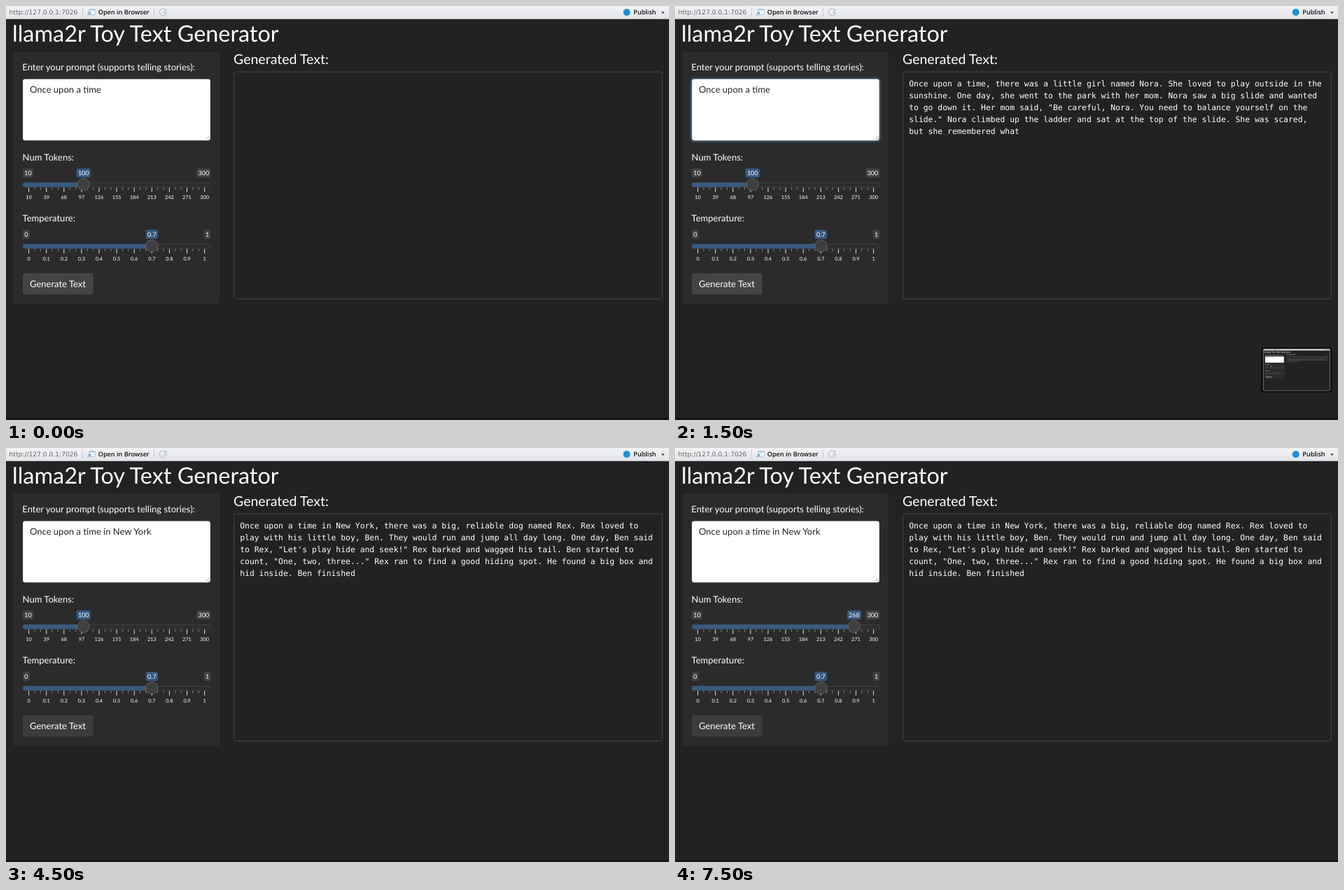
These frames come from a looping animation (947x592 px, 8000 ms). An HTML page:

```html
<!DOCTYPE html>
<html lang="en">
<head>
<meta charset="utf-8">
<title>llama2r Toy Text Generator</title>
<style>
  html, body { margin: 0; width: 100%; height: 100%; overflow: hidden; background: #222; }
  svg { display: block; }
  text { font-family: Lato, sans-serif; fill: #fff; white-space: pre; text-rendering: geometricPrecision; }
  .bar { font-family: "Open Sans", sans-serif; font-weight: 600; font-size: 9.1px; fill: #111; }
  .url { font-family: "DejaVu Sans", sans-serif; font-size: 9.15px; fill: #666; }
  .out { font-family: "DejaVu Sans Mono", monospace; font-size: 11.4px; }
</style>
</head>
<body>
<svg id="stage" width="947" height="592" viewBox="0 0 947 592"></svg>
<script>
const LOOP = 8000;
const LEFT = 24, RIGHT = 292.5, ROW = 87.8;
const stage = document.getElementById('stage');
const pen = document.createElement('canvas').getContext('2d');

const girlStory = [
  'Once upon a time, there was a little girl named Nora. She loved to play outside in the',
  'sunshine. One day, she went to the park with her mom. Nora saw a big slide and wanted',
  'to go down it. Her mom said, "Be careful, Nora. You need to balance yourself on the',
  'slide." Nora climbed up the ladder and sat at the top of the slide. She was scared,',
  'but she remembered what'
];
const dogStory = [
  'Once upon a time in New York, there was a big, reliable dog named Rex. Rex loved to',
  'play with his little boy, Ben. They would run and jump all day long. One day, Ben said',
  'to Rex, "Let\'s play hide and seek!" Rex barked and wagged his tail. Ben started to',
  'count, "One, two, three..." Rex ran to find a good hiding spot. He found a big box and',
  'hid inside. Ben finished'
];

// Each step overrides the state left by the steps before it.
const steps = [
  { at: 0, prompt: 'Once upon a time', story: [], tokens: 100, button: '#444' },
  { at: 500, story: girlStory, button: '#3c3c3c' },
  { at: 1500, focus: true, thumb: true, button: '#444' },
  { at: 2500, prompt: 'Once upon a time in New York', caret: true, thumb: false, button: '#3c3c3c' },
  { at: 3500, thumb: true },
  { at: 4500, story: dogStory, focus: false, caret: false, thumb: false },
  { at: 5500, hover: true },
  { at: 6500, tokens: 268 },
  { at: 7500, hover: false }
];

function textWidth(str, size) {
  pen.font = `${size}px Lato, sans-serif`;
  return pen.measureText(str).width;
}

const rect = (x, y, w, h, fill, r = 0, extra = '') =>
  `<rect x="${x}" y="${y}" width="${w}" height="${h}" rx="${r}" fill="${fill}" ${extra}/>`;

const text = (x, y, size, str, extra = '') =>
  `<text x="${x}" y="${y}" font-size="${size}" ${extra}>${str}</text>`;

const path = (d, stroke, width = 1, extra = '') =>
  `<path d="${d}" fill="none" stroke="${stroke}" stroke-width="${width}" ${extra}/>`;

// align: 0 puts the left edge at x, 0.5 the centre, 1 the right edge
function badge(x, align, y, value, fill) {
  const w = textWidth(value, 9) + 4.6;
  const left = x - w * align;
  return rect(left, y, w, 13, fill, 2.5) +
    text(left + w / 2, y + 9.8, 9, value, 'text-anchor="middle"');
}

function slider(row, title, low, high, value, hover) {
  const y = row * ROW;
  const x = 33 + (value - low) / (high - low) * 250.5;
  let ticks = '';
  for (let i = 0; i <= 30; i++) {
    const tx = 32.6 + i * 251 / 30, big = i % 3 === 0;
    ticks += path(`M${tx} ${y + 259.5}v${big ? 6.5 : 3.3}`, big ? '#fff' : '#999', 0.85);
    if (big) {
      const label = +(low + (high - low) * i / 30).toFixed(1);
      ticks += text(tx, y + 275.8, 7.33, label, 'text-anchor="middle"');
    }
  }
  return text(23.6, y + 220.5, 13.03, title) +
    badge(LEFT, 0, y + 232.2, low, '#414141') +
    badge(RIGHT, 1, y + 232.2, high, '#414141') +
    badge(x, 0.5, y + 232.2, value, '#375a7f') +
    ticks +
    rect(LEFT + 0.4, y + 252.7, RIGHT - LEFT - 0.8, 5.9, 'url(#groove)', 3, 'stroke="#444" stroke-width=".8"') +
    path(`M${x} ${y + 252.4}H${LEFT + 3.2}a3.25 3.25 0 0 0 0 6.5H${x}z`, 'none', 0, 'style="fill:#375a7f"') +
    `<circle cx="${x}" cy="${y + 255.2}" r="8.6" fill="${hover ? '#222' : '#3f3f3f'}" stroke="#6b6b6b" stroke-width=".8"/>`;
}

function toolbar() {
  return rect(0, 0, 947, 18.5, 'url(#chrome)') +
    path('M0 18.5H947', '#b4b6ba', 0.8) +
    '<text class="url" x="4.6" y="11.8">http://127.0.0.1:7026</text>' +
    path('M109.5 2V15M211.5 2V15', '#c8cacd') +
    rect(118.5, 4.5, 9, 8, '#f4f8fc', 1, 'stroke="#a9b9c9" stroke-width=".8"') +
    path('M118.5 5.5h9', '#a9c4de', 1.6) +
    path('M116.5 13l4-4m-3 0h3v3', '#6fa3d0', 1.2) +
    '<text class="bar" x="131.8" y="11.8">Open in Browser</text>' +
    path('M228.5 6.2a5 5 0 1 0 .6 3.4h-4.6M228.9 4v3h-3', '#b9c0cc', 1.2) +
    '<circle cx="886.7" cy="9" r="5" fill="#1b8fd8"/>' +
    '<text class="bar" x="896.3" y="11.8">Publish</text>' +
    '<path d="M936 8.3h4.6l-2.3 2.8z" fill="#333"/>';
}

function promptBox(s) {
  const caretX = 34.3 + textWidth(s.prompt, 13.03);
  return (s.focus ? rect(20.8, 101.2, 274.4, 94.4, '#375a7f', 6, 'opacity=".38"') : '') +
    rect(24.1, 104.5, 267.7, 87.8, '#fff', 3.2, s.focus ? 'stroke="#9badbf" stroke-width=".9"' : '') +
    path('M285.5 191l5.2-5.2M288.4 191l2.3-2.3', '#777', 0.7) +
    text(34, 124.2, 13.03, s.prompt, 'style="fill:#272727"') +
    (s.caret ? path(`M${caretX} 111.5V127`, '#222', 0.9) : '');
}

function scene(s) {
  const lines = s.story.map((line, i) =>
    `<text class="out" x="334.2" y="${115 + i * 17.1}">${line}</text>`).join('');
  return rect(0, 0, 947, 592, '#222') + toolbar() +
    text(9, 50.6, 32.4, 'llama2r Toy Text Generator') +
    rect(9.8, 65, 295.4, 361, '#2b2b2b', 4) +
    text(23.3, 92.3, 13.03, 'Enter your prompt (supports telling stories):') +
    promptBox(s) +
    slider(0, 'Num Tokens:', 10, 300, s.tokens, s.hover) +
    slider(1, 'Temperature:', 0, 1, 0.7, false) +
    rect(24, 382, 100.8, 30.4, s.button, 3.2) +
    text(34, 402, 13.03, 'Generate Text') +
    text(325, 83, 19.55, 'Generated Text:') +
    rect(325.7, 94.2, 611.6, 324.6, '#222', 3.2, 'stroke="#4a4a4a" stroke-width=".9"') +
    lines +
    rect(0, 589, 947, 3, '#191517');
}

const thumbnail = () =>
  rect(837.4, 488.2, 100.6, 64.4, '#0b0b0b', 2.5) +
  '<use href="#scene" transform="translate(840.6 490.7) scale(.1)"/>' +
  rect(840.4, 490.4, 95.1, 59.6, 'none', 0.8, 'stroke="#8a8a8a" stroke-width=".8"');

const gradient = (id, top, bottom) =>
  `<linearGradient id="${id}" x2="0" y2="1"><stop stop-color="${top}"/><stop offset="1" stop-color="${bottom}"/></linearGradient>`;
const defs = `<defs>${gradient('chrome', '#f2f3f5', '#e2e4e8')}${gradient('groove', '#303030', '#292929')}</defs>`;

let shown = 0;
function frame() {
  const t = performance.now() % LOOP;
  const past = steps.filter(step => step.at <= t);
  if (past.length !== shown) {
    shown = past.length;
    const state = Object.assign({}, ...past);
    stage.innerHTML = `${defs}<g id="scene">${scene(state)}</g>${state.thumb ? thumbnail() : ''}`;
  }
  requestAnimationFrame(frame);
}
frame();
</script>
</body>
</html>
```
